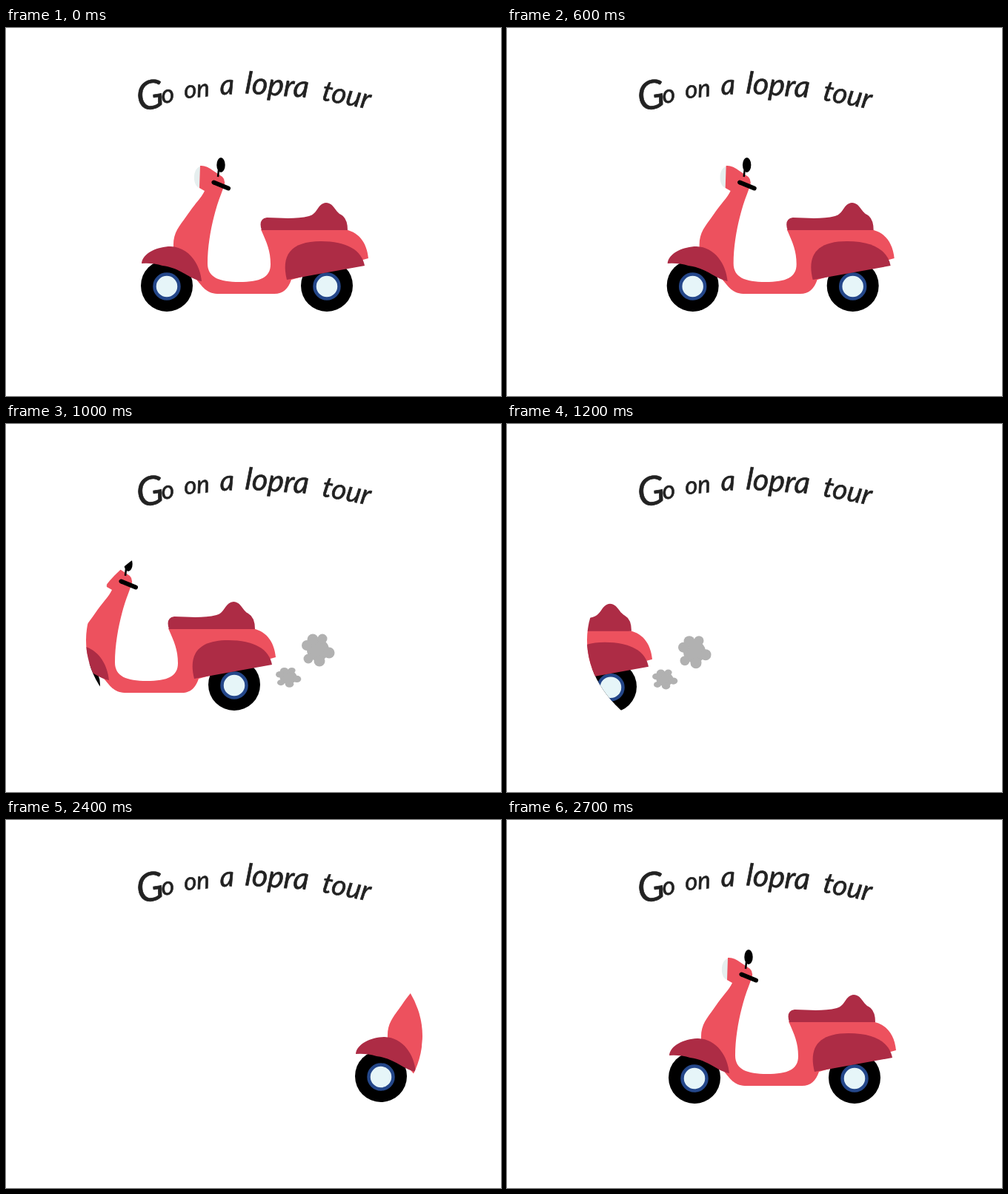
Write an HTML page that moves like this. It is 668 by 497 pixels and loops after 2800 ms.

```html
<!DOCTYPE html>
<html lang="en">
<head>
<meta charset="utf-8">
<title>Scooter tour</title>
<style>
  html, body { margin: 0; width: 100%; height: 100%; overflow: hidden; background: #fff; }
  svg { display: block; width: 100%; height: 100%; }
  text {
    font-family: Lato, "Open Sans", sans-serif; font-style: italic;
    fill: #222; stroke: #222; stroke-width: .7;
  }
</style>
</head>
<body>
<svg viewBox="0 0 668 497">
  <defs>
    <clipPath id="window"><ellipse cx="335" cy="292" rx="227" ry="157"/></clipPath>
    <g id="wheel">
      <circle r="35"/>
      <circle cy="1" r="16.5" fill="#e6f5f8" stroke="#24478a" stroke-width="4.5"/>
    </g>
    <g id="puff" fill="#b1b1b1">
      <circle r="15"/>
      <circle cx="-7" cy="-14" r="7.5"/>
      <circle cx="6" cy="-15" r="6.5"/>
      <circle cx="15" cy="4" r="7.5"/>
      <circle cx="2" cy="15" r="7.5"/>
      <circle cx="-13" cy="12" r="6.5"/>
      <circle cx="-15" cy="-6" r="7"/>
    </g>
  </defs>

  <g>
    <text transform="translate(179 112) rotate(-9)" font-size="54">G</text>
    <text transform="translate(211 102) rotate(-9)" font-size="34">o</text>
    <text transform="translate(241 95) rotate(-5)" font-size="33">on</text>
    <text transform="translate(289 90) rotate(-2)" font-size="38">a</text>
    <text transform="translate(322 88) rotate(4)" font-size="41">lopra</text>
    <text transform="translate(425 97) rotate(11)" font-size="38">tour</text>
  </g>

  <g clip-path="url(#window)">
    <g id="scooter">
      <use href="#wheel" x="217" y="348"/>
      <use href="#wheel" x="433" y="348"/>
      <path fill="#e6efef" d="M263 187C251 188 251 215 262 216Z"/>
      <path fill="#ed515e" d="M262 186Q270 185 280 193L292 201Q297 206 294 214L290 225
        C281 248 272 285 272 318C272 337 288 343 315 343C343 343 357 337 357 319
        C357 301 352 290 344 272H455C475 274 487 289 489 311L478 314L385 340
        C381 352 374 359 362 359H285C270 358 265 349 258 341L226 296
        C225 276 234 268 245 252C255 237 264 229 268 220L261 216Z"/>
      <g fill="#ad2c45">
        <path d="M345 273Q340 258 352 256C376 257 393 258 409 254C421 251 420 237 432 236
          C443 237 444 248 452 252Q461 257 461 273Z"/>
        <path d="M379 340C371 308 383 288 425 288C460 288 480 300 484 321Z"/>
        <path d="M183 318C184 304 205 295 222 295C247 296 262 319 264 342
          C247 339 236 324 211 321Q198 317 183 318Z"/>
      </g>
      <ellipse cx="290" cy="185" rx="5.7" ry="10"/>
      <path d="M287 192L286 201" stroke="#000" stroke-width="2.5"/>
      <path d="M280.500 208.500L300 216.500" stroke="#000" stroke-width="6" stroke-linecap="round"/>
    </g>
    <use id="bigPuff" href="#puff"/>
    <use id="smallPuff" href="#puff"/>
  </g>
</svg>
<script>
  const LOOP = 2800, STEP = 100;
  const byId = id => document.getElementById(id);
  const scooter = byId("scooter"), bigPuff = byId("bigPuff"), smallPuff = byId("smallPuff");

  // time, horizontal offset, vertical offset
  const drive = [
    [0, 0, 0], [400, 0, 0], [500, 67, 0], [800, -33, 0], [900, -67, 1],
    [1000, -125, 4], [1100, -209, 6], [1400, -461, 8],
    [2300, 373, -3], [2400, 289, -2], [2700, 36, 0], [2800, 0, 0]
  ];

  const mix = (a, b, k) => a + (b - a) * k;

  function offsetAt(time) {
    const i = drive.findIndex(key => key[0] > time);
    const [t0, x0, y0] = drive[i - 1], [t1, x1, y1] = drive[i];
    const k = (time - t0) / (t1 - t0);
    return [mix(x0, x1, k), mix(y0, y1, k)];
  }

  const show = (node, visible) => node.setAttribute("visibility", visible ? "visible" : "hidden");
  const place = (node, x, y, extra = "") =>
    node.setAttribute("transform", `translate(${x} ${y}) ${extra}`);

  function draw(now) {
    const time = Math.floor(now % LOOP / STEP) * STEP;
    const [x, y] = offsetAt(time);
    const smoking = time >= 500 && time < 1400;
    show(scooter, time < 1400 || time >= 2400);
    show(bigPuff, smoking);
    show(smallPuff, smoking);
    place(scooter, x, y);

    // The smoke catches up with the scooter, then travels along with it.
    const k = (Math.min(time, 1000) - 800) / 200;
    place(bigPuff, x + mix(574, 546, k), y + mix(278, 301, k));
    place(smallPuff, x + mix(527, 506, k), y + mix(321, 338, k), "scale(.77 .61)");
  }

  const start = performance.now();
  function tick() {
    draw(performance.now() - start);
    requestAnimationFrame(tick);
  }
  tick();
</script>
</body>
</html>
```
